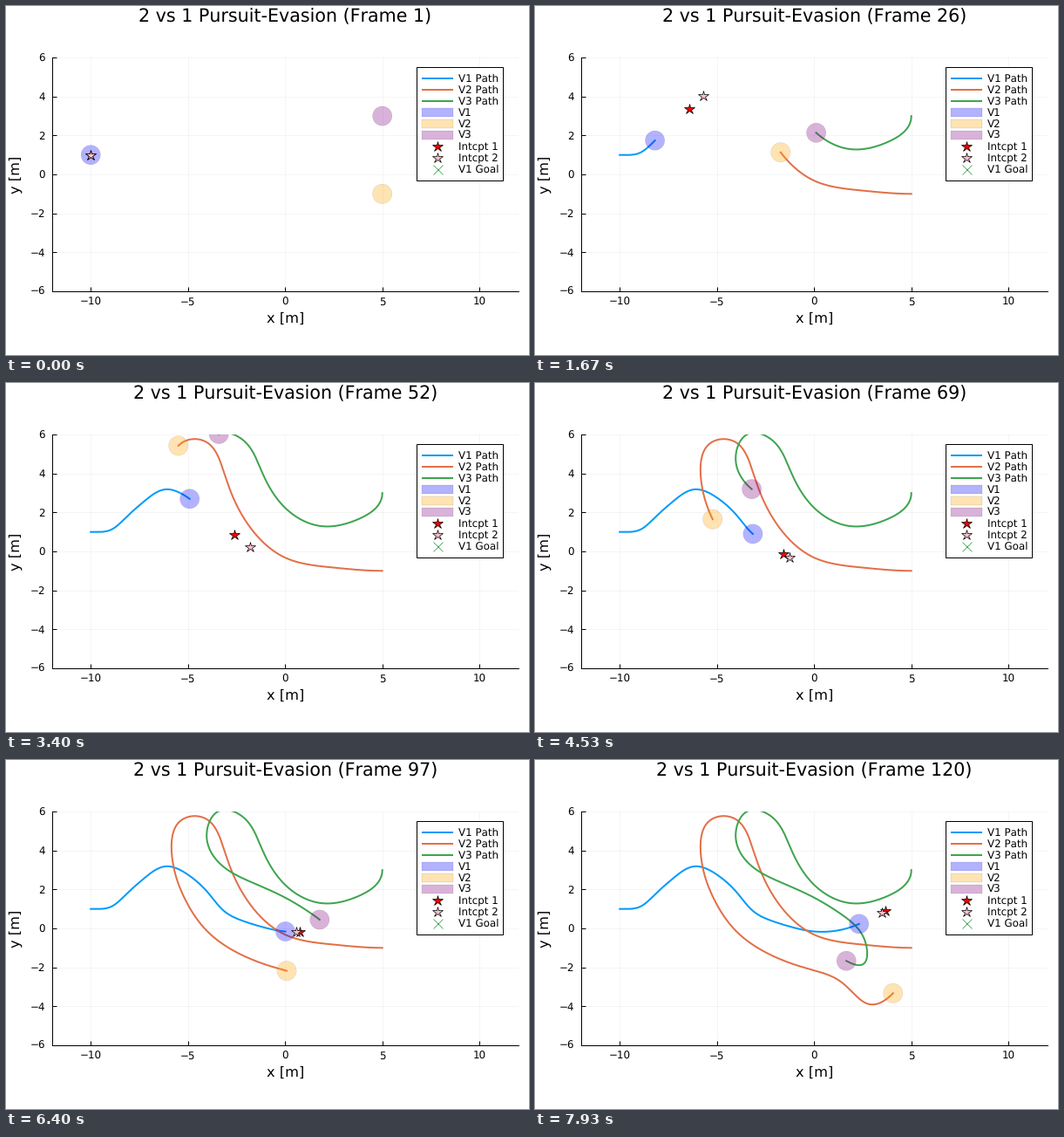
Animation, 600 px wide and 400 px high, one loop 8 s. Source, as a matplotlib script:

```python
import numpy as np
import matplotlib.pyplot as plt
from matplotlib.animation import FuncAnimation
from matplotlib.patches import Circle, Rectangle

plt.rcParams.update({
    "font.family": "DejaVu Sans",
    "text.hinting": "none",
    "text.kerning_factor": 6,
})

W, H, DPI = 600, 400, 100
LOOP, STEPS, SUB = 8000, 120, 3     # SUB drawn frames per simulation step
PX = 72 / DPI                       # one pixel in points
SCALE, X0, Y0 = 22.3, 320.2, 193.0  # pixels per metre, place of the origin
KEY_GAP = 8.5                       # steps between key points

LINES = ["#009afa", "#e36f47", "#3ea44e"]
FILLS = ["blue", "orange", "purple"]
STARS = ["red", "pink"]


class Vehicle:
    """Cubic spline through key points (metres) equally spaced in time."""

    def __init__(self, start_velocity, *points):
        self.p = p = np.array(points)
        n, h = len(p), KEY_GAP
        A = np.eye(n) * 4 + np.eye(n, k=1) + np.eye(n, k=-1)
        b = np.zeros_like(p)
        b[1:-1] = 6 * (p[2:] - 2 * p[1:-1] + p[:-2]) / h**2
        A[0, :2] = 2, 1             # given velocity at the start
        b[0] = 6 * ((p[1] - p[0]) / h - start_velocity) / h
        A[-1, -2:] = -1, 1          # steady acceleration at the end
        self.m = np.linalg.solve(A, b)

    def at(self, t):
        u = (np.asarray(t, float) - 1) / KEY_GAP
        i = np.clip(np.floor(u).astype(int), 0, len(self.p) - 2)
        w = (u - i)[..., None]
        v, k = 1 - w, KEY_GAP**2 / 6
        return (v * self.p[i] + w * self.p[i + 1]
                + k * ((v**3 - v) * self.m[i] + (w**3 - w) * self.m[i + 1]))

    def velocity(self, t):
        return (self.at(t + .1) - self.at(t - .1)) / .2


V1 = Vehicle((0, 0),
             (-10, 1), (-9.72, 1), (-8.94, 1.12), (-8.14, 1.79),
             (-7.22, 2.6), (-6.12, 3.19), (-4.91, 2.7), (-3.96, 1.83),
             (-3.15, .9), (-2.16, .38), (-1.16, .07), (-.25, -.13),
             (.64, -.17), (1.49, -.05), (2.31, .23))
V2 = Vehicle((-.3, 0),
             (5, -1), (2.47, -.83), (.02, -.33), (-1.81, 1.25),
             (-2.93, 3.43), (-3.88, 5.5), (-5.49, 5.43), (-5.8, 3.54),
             (-5.22, 1.65), (-4.09, -.06), (-2.42, -1.27), (-.49, -2.02),
             (1.32, -2.7), (2.64, -3.83), (4.06, -3.33))
V3 = Vehicle((0, -.24),
             (5, 3), (3.73, 1.64), (1.77, 1.31), (.02, 2.22),
             (-1.1, 3.88), (-1.97, 5.54), (-3.41, 6.03), (-4.03, 4.63),
             (-3.21, 3.2), (-1.72, 2.37), (-.13, 1.65), (1.38, .74),
             (2.5, -.37), (2.66, -1.68), (1.66, -1.67))
VEHICLES = [V1, V2, V3]
CHASE = [.296, .245]                # assumed pursuer speeds, metres per step


def intercept(t, hunter, speed):
    """Point where the hunter would meet V1 if V1 held its course."""
    course = V1.velocity(t + 2)
    v = course * np.linalg.norm(V1.velocity(t)) / np.linalg.norm(course)
    d = hunter.at(t) - V1.at(t)
    a, b = speed**2 - v @ v, d @ v
    return V1.at(t) + v * (np.sqrt(b * b + a * (d @ d)) - b) / a


fig = plt.figure(figsize=(W / DPI, H / DPI), dpi=DPI, facecolor="white")
ax = fig.add_axes([(X0 - 12 * SCALE) / W, 1 - (Y0 + 6 * SCALE) / H,
                   24 * SCALE / W, 12 * SCALE / H])
ax.set(xlim=(-12, 12), ylim=(-6, 6),
       xticks=range(-10, 11, 5), yticks=range(-6, 7, 2))
ax.set_axisbelow(True)
ax.grid(color="black", alpha=.06, lw=.5)
ax.tick_params(direction="in", length=5 * PX, width=PX,
               labelbottom=False, labelleft=False)
ax.spines[["top", "right"]].set_visible(False)
ax.spines[["left", "bottom"]].set_linewidth(PX)

hud = fig.add_axes([0, 0, 1, 1])
hud.set(xlim=(0, W), ylim=(H, 0))
hud.axis("off")


def label(x, y, s, px, **kw):
    return hud.text(x, y, s, fontsize=px * PX, **{"va": "baseline", **kw})


def star(axes, color, x, y):
    return axes.plot([x], [y], "*", ms=13 * PX, mfc=color, mec="black",
                     mew=.7 * PX, zorder=5)[0]


def num(v):
    return str(v).replace("-", "\u2212")


SMALL = 11.85
for v in range(-10, 11, 5):
    label(X0 + v * SCALE, 342.8, num(v), SMALL, ha="center")
for v in range(-6, 7, 2):
    label(45, Y0 - v * SCALE + 4.4, num(v), SMALL, ha="right")
label(X0 + .5, 363, "x [m]", 16.3, ha="center")
label(11, Y0, "y [m]", 16.3, ha="center", va="center", rotation=90)
title = label(X0 + .3, 18.3, "", 20.7, ha="center")

# legend
hud.add_patch(Rectangle((470.5, 69.5), 99, 130, fc="white", ec="black",
                        lw=PX))
NAMES = ["V1 Path", "V2 Path", "V3 Path", "V1", "V2", "V3",
         "Intcpt 1", "Intcpt 2", "V1 Goal"]
for i, name in enumerate(NAMES):
    y = 83 + 13 * i
    label(518.8, y + 4.3, name, SMALL)
    if i < 3:
        hud.plot([477, 513], [y, y], color=LINES[i], lw=2 * PX,
                 solid_capstyle="butt")
    elif i < 6:
        hud.add_patch(Rectangle((477, y - 5), 36, 10, fc=FILLS[i - 3],
                                ec="black", lw=.3 * PX, alpha=.3))
    elif i < 8:
        star(hud, STARS[i - 6], 495, y)
    else:
        hud.plot([495], [y], "x", ms=11 * PX, mew=.8 * PX, color=LINES[2])

paths = [ax.plot([], [], color=c, lw=2 * PX, zorder=3)[0] for c in LINES]
discs = [ax.add_patch(Circle((0, 0), .5, fc=c, ec="black", lw=.2 * PX,
                             alpha=.3, zorder=4)) for c in FILLS]
aims = [star(ax, c, 0, 0) for c in STARS]


def update(i):
    step = min((i + 1) // SUB, STEPS - 1)
    t = step + 1
    title.set_text(f"2 vs 1 Pursuit-Evasion (Frame {t})")
    past = np.linspace(1, t, 3 * step + 1)
    for car, path, disc in zip(VEHICLES, paths, discs):
        trail = car.at(past)
        path.set_data(*trail.T)
        disc.center = trail[-1]
    for aim, hunter, speed in zip(aims, VEHICLES[1:], CHASE):
        x, y = intercept(t, hunter, speed)
        aim.set_data([x], [y])


anim = FuncAnimation(fig, update, frames=STEPS * SUB,
                     interval=LOOP / (STEPS * SUB),
                     repeat=True, repeat_delay=0)
plt.show()
```
